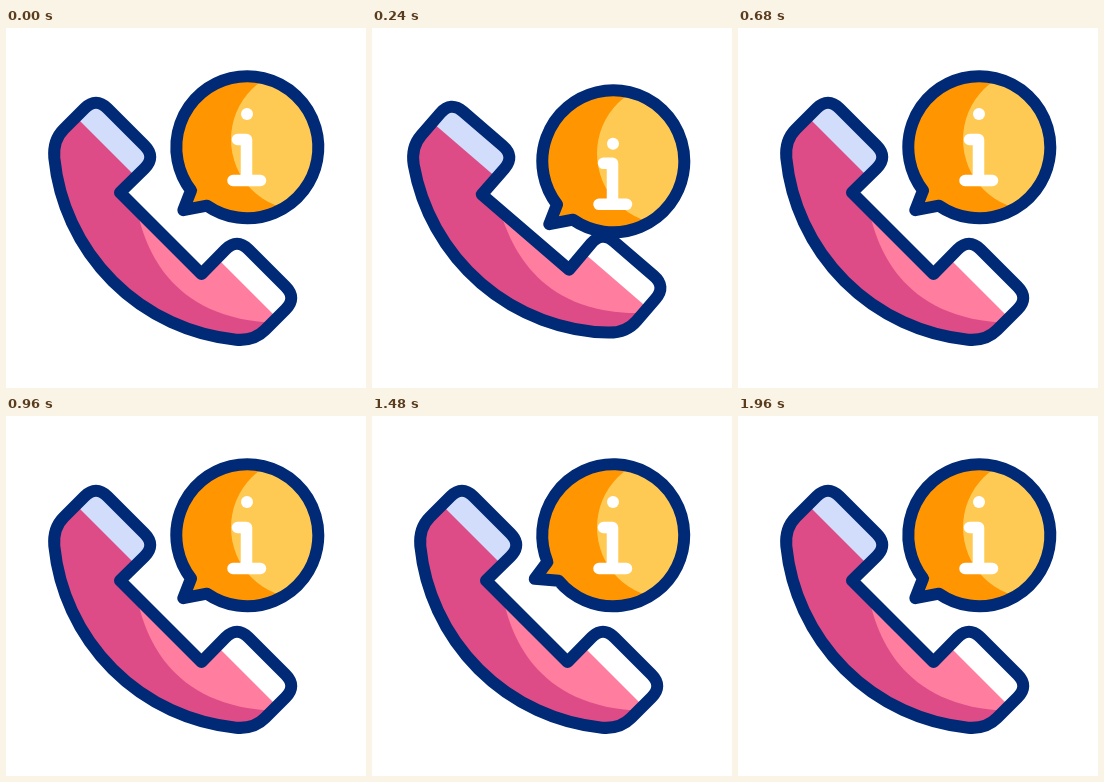
Recreate the animation shown at these times as an HTML page. Size 360 by 360 pixels, loop 2 s.

```html
<!DOCTYPE html>
<html lang="en">
<head>
<meta charset="utf-8">
<title>Phone information</title>
<style>
  html, body { margin: 0; width: 100%; height: 100%; overflow: hidden; background: #fff; }
  svg { display: block; width: 100vw; height: 100vh; }
  .line { fill: none; stroke: #002976; stroke-width: 12; stroke-linejoin: round; }
  .mark { fill: none; stroke: #fff; stroke-width: 11.5; stroke-linecap: round; stroke-linejoin: round; }
</style>
</head>
<body>
<svg viewBox="0 0 360 360">
  <defs>
    <path id="handset" d="M48.3 130Q46.8 112 58 101L78.5 80.5Q90 69 101.5 80.5L138.5 117.5Q150 129 138.5 140.5L114 164.5
      L195.5 246L219.5 221.5Q231 210 242.5 221.5L279.5 258.5Q291 270 279.5 281.5L259 302Q248 313.2 230 311.7A203 203 0 0 1 48.3 130Z"/>
    <path id="balloon" d="M185 162.5L177.3 182.2L201 177.7A71 71 0 1 0 185 162.5Z"/>
    <clipPath id="inHandset"><use href="#handset"/></clipPath>
    <clipPath id="inBalloon"><circle cx="241" cy="119" r="70"/></clipPath>
  </defs>
  <g id="phone">
    <g clip-path="url(#inHandset)">
      <path fill="#dd4c86" d="M0 0H360V360H0Z"/>
      <path fill="#ff7d9f" d="M130 178C138 215 160 292 272 295L310 270L225 180Z"/>
      <path fill="#d2ddfc" d="M40 59L165 184V59Z"/>
      <path fill="#fff" d="M195 214L310 329V200H195Z"/>
    </g>
    <use href="#handset" class="line"/>
  </g>
  <g id="bubble">
    <use href="#balloon" class="tail" fill="#ff9500"/>
    <circle cx="296" cy="111.5" r="71" fill="#ffca54" clip-path="url(#inBalloon)"/>
    <use href="#balloon" class="tail line"/>
  </g>
  <path id="stem" class="mark" d="M231.5 111.5H240.5V152.5M227 152.5H254.5"/>
  <circle id="dot" cx="241" cy="86" r="6" fill="#fff"/>
</svg>
<script>
  const LOOP = 2000, STEP = 40;
  const $ = id => document.getElementById(id);
  const tails = document.querySelectorAll('.tail');
  const ease = u => u * u * (3 - 2 * u);

  // Eased value at time t through [time, value] keys.
  function track(t, keys) {
    const i = keys.findIndex(k => k[0] > t);
    if (i < 0) return keys[keys.length - 1][1];
    if (i === 0) return keys[0][1];
    const [t0, a] = keys[i - 1], [t1, b] = keys[i];
    return a + (b - a) * ease((t - t0) / (t1 - t0));
  }

  const shift = (id, y) => $(id).setAttribute('transform', `translate(0 ${y})`);
  const turn = (el, angle, x, y) => el.setAttribute('transform', `rotate(${angle} ${x} ${y})`);

  function draw(t) {
    const drop = track(t, [[0, 0], [310, 16.1], [680, 0]]);
    shift('bubble', drop);
    shift('stem', drop * 1.7);
    shift('dot', drop * 2.13);
    turn($('phone'), track(t, [[0, 0], [110, 4.4], [260, -4.7], [680, 0]]), 138, 222);
    const swing = track(t, [[1160, 0], [1600, 19], [1960, 0]]);
    tails.forEach(el => turn(el, swing, 241, 119));
  }

  const start = performance.now();
  function frame() {
    const t = (performance.now() - start) % LOOP;
    draw(Math.floor(t / STEP) * STEP);
    requestAnimationFrame(frame);
  }
  frame();
</script>
</body>
</html>
```
